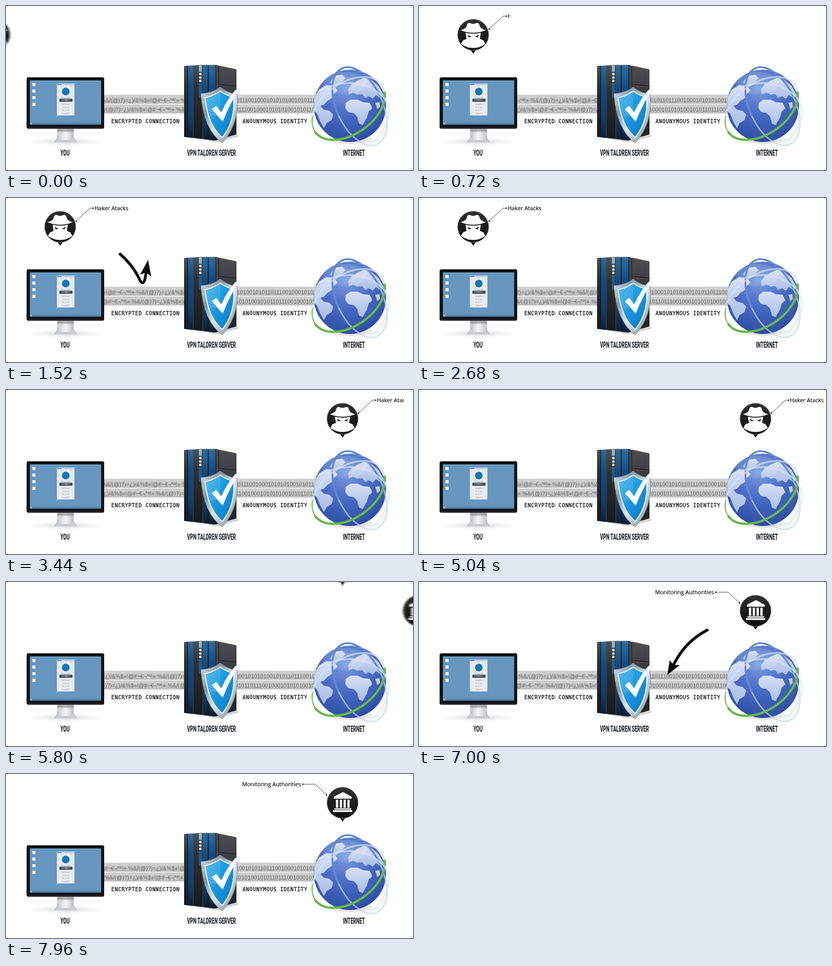
An HTML page for the animation above (8000 ms loop, 800x322 px).

```html
<!DOCTYPE html>
<html lang="en">
<head>
<meta charset="utf-8">
<title>Encrypted connection</title>
<style>
  html, body { margin: 0; width: 100%; height: 100%; overflow: hidden; background: #fff; }
  svg { display: block; width: 800px; height: 322px; }
  .stream text { font: 11px "Liberation Sans", Arial, sans-serif; fill: #808080; stroke: #808080; stroke-width: .25px; white-space: pre; }
  .mono { font: 10px "DejaVu Sans Mono", monospace; letter-spacing: .7px; fill: #111; stroke: #111; stroke-width: .3px; }
  .title { font: 900 16px Roboto, sans-serif; fill: #2b2f33; text-anchor: middle; }
  .note { font: 11px "Open Sans", sans-serif; fill: #111; stroke: #111; stroke-width: .2px; }
  .tiny { font: 3.6px "Open Sans", sans-serif; text-anchor: middle; fill: #8a949c; }
  .lead { fill: none; stroke: #333; stroke-width: .9; }
  .arrow path { fill: none; stroke: #0c0c0c; stroke-width: 5.5; stroke-linecap: round; stroke-linejoin: round; }
  .arrow polygon { fill: #0c0c0c; }
</style>
</head>
<body>
<svg viewBox="0 0 800 322">
  <defs>
    <linearGradient id="band" x2="0" y2="1"><stop stop-color="#d3d3d3"/><stop offset=".5" stop-color="#c6c6c6"/><stop offset="1" stop-color="#bebebe"/></linearGradient>
    <linearGradient id="metal"><stop stop-color="#b4b8bb"/><stop offset=".5" stop-color="#f4f5f6"/><stop offset="1" stop-color="#b0b3b6"/></linearGradient>
    <linearGradient id="silver" x2="1" y2="1"><stop stop-color="#dfe8ee"/><stop offset=".3" stop-color="#8298a7"/><stop offset=".55" stop-color="#dfe8ed"/><stop offset="1" stop-color="#6f8390"/></linearGradient>
    <linearGradient id="shield" x2="1" y2="1"><stop stop-color="#3fb4ee"/><stop offset=".5" stop-color="#1896e0"/><stop offset="1" stop-color="#0a74c6"/></linearGradient>
    <linearGradient id="stripe" x2="0" y2="1"><stop stop-color="#2a6ea6"/><stop offset=".3" stop-color="#0d4c88"/><stop offset=".7" stop-color="#0b3d70"/><stop offset="1" stop-color="#0a1f38"/></linearGradient>
    <linearGradient id="front" x2="0" y2="1"><stop stop-color="#4b4f53"/><stop offset=".3" stop-color="#2d3033"/><stop offset="1" stop-color="#17191b"/></linearGradient>
    <linearGradient id="side" x2="0" y2="1"><stop stop-color="#4c4e51"/><stop offset=".4" stop-color="#37393c"/><stop offset="1" stop-color="#1d1f21"/></linearGradient>
    <radialGradient id="sea" cx=".45" cy=".25" r=".8"><stop stop-color="#7d9ce2"/><stop offset=".45" stop-color="#4a6cc3"/><stop offset="1" stop-color="#2a4a9f"/></radialGradient>
    <linearGradient id="land" x2="0" y2="1"><stop stop-color="#d5e0f6"/><stop offset="1" stop-color="#a9bde8"/></linearGradient>
    <radialGradient id="shade"><stop stop-color="#777" stop-opacity=".6"/><stop offset="1" stop-color="#999" stop-opacity="0"/></radialGradient>
    <linearGradient id="disc" x2="0" y2="1"><stop stop-color="#303030"/><stop offset=".5" stop-color="#1d1d1d"/><stop offset="1" stop-color="#111"/></linearGradient>
    <filter id="smearX" x="-30%" width="160%"><feGaussianBlur stdDeviation="2 .3"/></filter>
    <filter id="smearY" y="-30%" height="160%"><feGaussianBlur stdDeviation=".3 2"/></filter>
    <clipPath id="leftPipe"><rect x="192" y="172" width="160" height="42"/></clipPath>
    <clipPath id="rightPipe"><rect x="450" y="172" width="158" height="42"/></clipPath>
    <clipPath id="hackerWipe"><rect x="-2" y="-12" height="45"/></clipPath>
    <clipPath id="officeWipe"><rect y="8" height="45"/></clipPath>
    <clipPath id="globeEdge"><circle cx="676" cy="196" r="71"/></clipPath>
  </defs>

  <rect x="185" y="174" width="440" height="18" fill="url(#band)"/>
  <rect x="185" y="193" width="440" height="18" fill="url(#band)"/>
  <g class="stream" id="left" clip-path="url(#leftPipe)"></g>
  <g class="stream" id="right" clip-path="url(#rightPipe)"></g>

  <g id="monitor">
    <ellipse cx="117" cy="266" rx="72" ry="8" fill="url(#shade)" opacity=".5"/>
    <path d="M101 240H133L134 259Q135 263 139 265H95Q99 263 100 259Z" fill="url(#metal)"/>
    <path d="M101 240H133V247H101Z" fill="#777" opacity=".5"/>
    <path d="M94 265Q117 261 140 265V268H94Z" fill="#c9ccce"/>
    <rect x="40.500" y="140" width="152.500" height="101" rx="3.500" fill="#141416"/>
    <path d="M42 239.500H192" stroke="#4a4a4d"/>
    <rect x="47" y="146" width="140" height="87" fill="#6797bf"/>
    <rect x="47" y="229" width="140" height="4" fill="#5685ad"/>
    <rect x="48" y="230" width="3" height="2" fill="#dce8f2"/>
    <path d="M52 154h6m-6 13h6m-6 13h6m-6 13h6" stroke="#f4f8fb" stroke-width="6"/>
    <rect x="100" y="152" width="34.500" height="63" fill="#e6ebef"/>
    <rect x="100" y="152" width="34.500" height="4" fill="#bfd2e2"/>
    <path d="M101 154h8" stroke="#3a78b0" stroke-width="1.500"/>
    <circle cx="117.500" cy="168" r="7.500" fill="#1674ba"/>
    <rect x="105" y="182" width="25.500" height="6" fill="#414a52"/>
  </g>

  <g id="server">
    <path d="M352 256L412 268L458 256L440 240Z" fill="#888" opacity=".35"/>
    <path d="M350 118L386 116H413V264L350 257Z" fill="url(#front)"/>
    <path d="M358 118H367V259L358 258ZM388 116H396V262L388 261ZM399 116H411V264L399 263Z" fill="url(#stripe)"/>
    <path d="M368 117V259M387 116V261" stroke="#5c6268" opacity=".7"/>
    <path d="M357 118V258M397.500 116V262" stroke="#111416"/>
    <path d="M379 116H385V129H379Z" fill="#8db4cf"/>
    <path d="M379 151H385V180H379Z" fill="#1b5c95"/>
    <g fill="#d8dde1"><circle cx="382" cy="133.500" r="2.600"/><circle cx="382" cy="140.500" r="2.600"/><circle cx="382" cy="147" r="2.600"/></g>
    <path d="M412 116L453 125V252L412 264Z" fill="url(#side)"/>
    <path d="M350 118L386 116H413L453 124.500" fill="none" stroke="#74787c" stroke-width="1.200"/>
    <path d="M412.500 116V264M418 154L453 157M418 118V262" fill="none" stroke="#191b1d"/>
    <path d="M383 172Q406 171 421 159Q435 171 454 173Q460 230 425 269Q388 242 383 172Z" fill="url(#silver)" stroke="#71828e"/>
    <path d="M391.500 180Q408 177 421 167Q433 176 447.500 179Q451 226 425 258Q396 233 391.500 180Z" fill="url(#shield)" stroke="#f2f8fb" stroke-width="2"/>
    <path d="M393 182Q409 179 421 169V214Q408 217 398 221Q394 204 393 182Z" fill="#fff" opacity=".1"/>
    <path d="M405 203L413 196L423 209Q435 183 451 165L459 164Q440 190 426 227Z" fill="#fff" stroke="#cfe2ee" stroke-width=".7"/>
  </g>

  <g id="globe">
    <ellipse cx="680" cy="264" rx="62" ry="9" fill="url(#shade)" opacity=".7"/>
    <circle cx="676" cy="196" r="71" fill="url(#sea)"/>
    <g clip-path="url(#globeEdge)" fill="url(#land)">
      <path d="M606 180L616 163L630 155L645 158L652 166L645 172L640 181L631 187L625 194L618 196L624 203L636 206L643 213L640 224L630 230L625 240L617 226L612 212L605 205Z"/>
      <path d="M637 150L646 137L661 135L668 142L657 151L645 158Z"/>
      <path d="M672 164L679 154L690 147L704 141L718 145L733 158L743 176L735 180L727 175L721 182L713 177L706 181L700 173L690 174L682 170L674 174Z"/>
      <path d="M668 190L677 184L691 184L702 189L715 190L720 201L713 207L709 220L701 234L694 231L690 217L683 210L672 208L667 200Z"/>
      <path d="M726 190L734 189L735 198L730 203Z"/>
    </g>
    <ellipse cx="665" cy="151" rx="43" ry="22" fill="#fff" opacity=".1"/>
    <g fill="none">
      <g transform="translate(695 197) rotate(-25)">
        <ellipse rx="45" ry="82" stroke="#c4d5f2" stroke-width="3" opacity=".7"/>
        <path d="M-45 0A45 82 0 0 1 45 0" stroke="#6486cf" stroke-width="3.500"/>
      </g>
      <g transform="translate(673 201) rotate(-35)">
        <ellipse rx="80" ry="50" stroke="#d5e1f5" stroke-width="3.500" opacity=".7"/>
        <path d="M-80 0A80 50 0 0 0 77 14" stroke="#69b846" stroke-width="4.500"/>
        <path d="M-80 0Q-79 -16 -66 -28" stroke="#7cc25c" stroke-width="2"/>
      </g>
      <path d="M612 168Q690 130 741 178Q770 212 725 266" stroke="#d6e3f7" stroke-width="3.500" opacity=".65"/>
    </g>
  </g>

  <text class="mono" x="207" y="230">ENCRYPTED CONNECTION</text>
  <text class="mono" x="465" y="230">ANOUNYMOUS IDENTITY</text>
  <g id="titles"></g>

  <g class="arrow" id="attack">
    <path d="M138 68Q190 84 222 108Q250 132 262 159Q270 176 274 155L322 -150"/>
    <polygon points="0,0 -31,-11 -25,0 -31,11"/>
  </g>
  <g class="arrow" id="probe">
    <path d="M640 74Q595 80 567 94Q528 115 508 149L490 180Q485 188 481 175L430 -150"/>
    <polygon points="0,0 -29,-11 -23,0 -27,11"/>
  </g>

  <g id="hackerNote"><g clip-path="url(#hackerWipe)">
    <path class="lead" d="M0 26L28 0H35"/><circle cx="1" cy="25.500" r="1.300"/><circle cx="34.500" r="1.300"/>
    <text class="note" x="37" y="3.700">Haker Atacks</text>
  </g></g>
  <g id="officeNote" clip-path="url(#officeWipe)">
    <path class="lead" d="M583 20H608L630 41"/><circle cx="583.500" cy="20" r="1.300"/><circle cx="630" cy="41" r="1.300"/>
    <text class="note" x="464" y="24">Monitoring Authorities</text>
  </g>

  <g id="hacker">
    <path d="M-6 29L0 37L6 29Z" fill="#1c1c1c"/>
    <circle r="30.500" fill="url(#disc)" stroke="#6b6b6b"/>
    <path fill="#fff" d="M-25 -9Q-14 -12 -13 -17Q-11 -25 -6 -23Q0 -20 6 -23Q11 -25 13 -17Q14 -12 25 -9Q12 -4 0 -4Q-12 -4 -25 -9Z"/>
    <path fill="#fff" d="M-15 -4Q0 0 15 -4L13 8L20 11L24 18Q13 26 0 26Q-13 26 -24 18L-20 11L-13 8Z"/>
    <path fill="#222" d="M-11 0L-3 4L-9 5ZM11 0L3 4L9 5Z"/>
  </g>
  <g id="office">
    <path d="M-6 29L0 37L6 29Z" fill="#1c1c1c"/>
    <circle r="30.500" fill="url(#disc)" stroke="#6b6b6b"/>
    <path fill="#fff" d="M-17 -12L1 -21L18 -12V-8H-17ZM-13 -6h4.500v16h-4.500ZM-5.500 -6h4.500v16h-4.500ZM2 -6h4.500v16h-4.500ZM9.500 -6h4.500v16h-4.500ZM-16 11H17V13.500H-16ZM-19 14.500H19V18H-19Z"/>
  </g>
</svg>
<script>
const LOOP = 8000;
const $ = id => document.getElementById(id);
const SVG = "http://www.w3.org/2000/svg";

function addText(parent, content, attrs) {
  const node = document.createElementNS(SVG, "text");
  for (const key in attrs) node.setAttribute(key, attrs[key]);
  node.textContent = content;
  parent.append(node);
  return node;
}

for (const [x, title] of [[116, "YOU"], [404, "VPN TALDREN SERVER"], [684, "INTERNET"]])
  addText($("titles"), title, { class: "title", transform: `translate(${x} 293.500) scale(.57 1)` });

for (const [y, word, color] of [[180.5, "Secure line", "#2b7cb8"], [186.4, "CONNECT", "#fff"],
    [193.5, "Location"], [199.5, "Settings"], [206, "Account"], [212, "Support"]])
  addText($("monitor"), word, { class: "tiny", x: 117.5, y, ...(color && { style: `fill:${color}` }) });

const symbols = "!@#~€¬*ª!»·%&/(@)?)=¿)/&%$»";
const bits = "1110010001010101001010110";
// phase: share of the pattern hidden left of x; turn: ms per pattern, negative moves right
const streams = [
  { id: "left", pattern: symbols, x: 193, y: 188.5, phase: .43, turn: -3395 },
  { id: "left", pattern: symbols, x: 193, y: 206.5, phase: .487, turn: 2753 },
  { id: "right", pattern: bits, x: 457, y: 188.5, phase: -.01, turn: -3380 },
  { id: "right", pattern: bits, x: 457, y: 206.5, phase: 0, turn: 3210 },
].map(s => {
  const node = addText($(s.id), s.pattern.repeat(4), { y: s.y });
  return { ...s, node, period: node.getComputedTextLength() / 4 };
});

const clamp = v => Math.min(1, Math.max(0, v));
const part = (t, start, length) => clamp((t - start) / length);
const easeOut = p => 1 - (1 - p) ** 3;
const easeInOut = p => p < .5 ? 4 * p ** 3 : 1 - (2 - 2 * p) ** 3 / 2;

function scroll(t) {
  for (const { node, x, phase, turn, period } of streams) {
    const shift = (((phase + t / turn) % 1) + 1) % 1;
    node.setAttribute("x", x - (shift + 1) * period);
  }
}

function place(id, x, y, visible, smear) {
  const node = $(id);
  node.setAttribute("transform", `translate(${x} ${y})`);
  node.style.display = visible ? "" : "none";
  node.style.filter = smear ? `url(#${smear})` : "none";
}

function flyArrow(id, head) {
  const group = $(id), [path, tip] = group.children;
  const total = path.getTotalLength();
  const visible = head > 20 && head < total;
  group.style.display = visible ? "" : "none";
  if (!visible) return;
  const tail = Math.max(0, head - 120), end = head - 22;
  path.style.strokeDasharray = `${Math.max(.1, end - tail)} 2000`;
  path.style.strokeDashoffset = -tail;
  const a = path.getPointAtLength(end), b = path.getPointAtLength(head);
  const angle = Math.atan2(b.y - a.y, b.x - a.x) * 180 / Math.PI;
  tip.setAttribute("transform", `translate(${b.x} ${b.y}) rotate(${angle})`);
}

function draw(t) {
  scroll(t);

  const enter = easeOut(part(t, -40, 600));
  const cross = easeInOut(part(t, 2820, 420));
  const rise = part(t, 5400, 440) ** 2;
  const hackerX = 106.5 - 160 * (1 - enter) + 555 * cross;
  const sliding = t < 320 || (t > 2900 && t < 3160);
  place("hacker", hackerX, 56.5 - 105 * rise, t < 5880, sliding ? "smearX" : t > 5560 ? "smearY" : "");

  const arrive = easeOut(part(t, 5760, 600));
  place("office", 661.5 + 185 * (1 - arrive), 56.5, t >= 5760, t < 6120 ? "smearX" : "");

  const atGlobe = t > 3000;
  const shown = atGlobe
    ? part(t, 3240, 240) - part(t, 5160, 200)
    : part(t, 640, 200) - part(t, 2700, 120);
  place("hackerNote", atGlobe ? 692 : 137, 20, shown > 0, "");
  $("hackerWipe").firstElementChild.setAttribute("width", 110 * shown);

  const revealed = 172 * part(t, 6400, 240);
  const officeRect = $("officeWipe").firstElementChild;
  officeRect.setAttribute("x", 633 - revealed);
  officeRect.setAttribute("width", revealed);

  flyArrow("attack", 216 + .55 * (t - 1520));
  flyArrow("probe", 196 + .55 * (t - 7000));
}

function tick() {
  draw(performance.now() % LOOP);
  requestAnimationFrame(tick);
}
tick();
</script>
</body>
</html>
```
